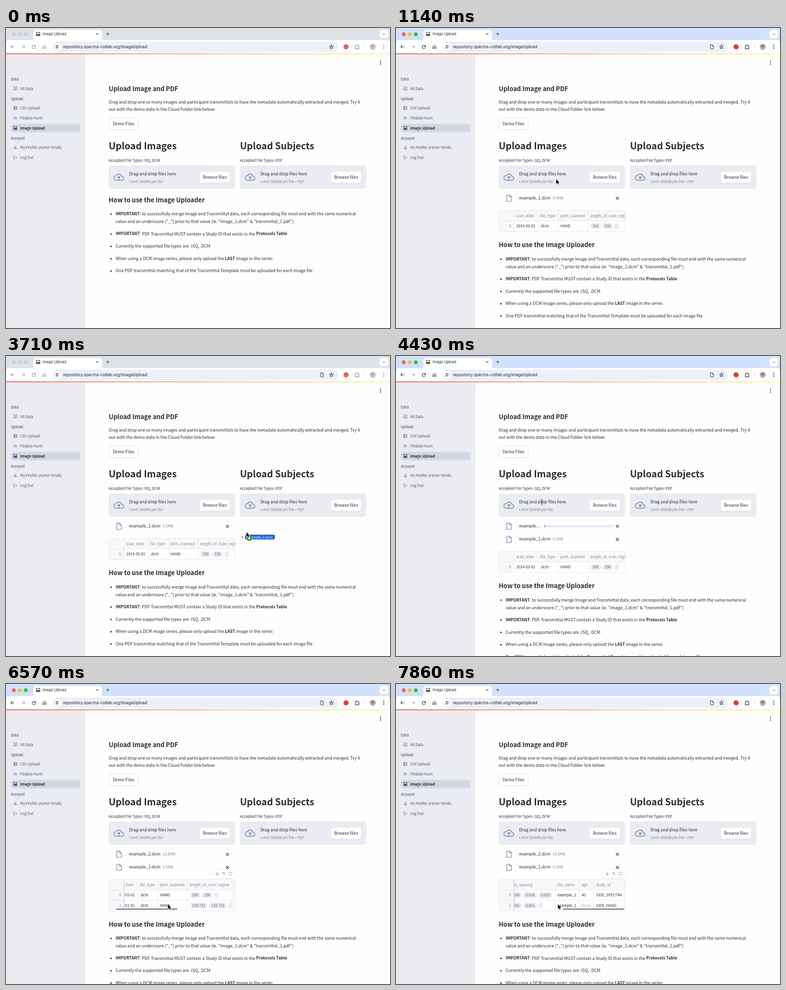
These frames come from a looping animation (800x623 px, 8 s). An HTML page with a canvas:

```html
<!DOCTYPE html>
<html lang="en">
<head>
<meta charset="utf-8">
<title>Image Upload</title>
<style>
html, body { margin: 0; width: 100%; height: 100%; overflow: hidden; background: #fefefe; }
canvas { display: block; width: 100vw; height: 100vh; }
</style>
</head>
<body>
<canvas></canvas>
<script>
const W = 800, H = 623, LOOP = 8000, FPS = 7;
const PAGE_FONT = '"Noto Sans CJK JP", "Noto Sans CJK SC", "Noto Sans CJK", sans-serif';
const UI_FONT = 'Inter, Roboto, sans-serif';
const BODY = 8.82, SMALL = 7.7;
const INK = '#292a33', GREY = '#82848f', PANEL = '#eaecf1', LINE = '#e3e4e9', STEEL = '#8192b0';

const canvas = document.querySelector('canvas');
const ratio = window.devicePixelRatio || 1;
canvas.width = W * ratio;
canvas.height = H * ratio;
const ctx = canvas.getContext('2d');
ctx.scale(ratio, ratio);

// Icon outlines on a 24 unit grid
const ICONS = {
  back: 'M20 12H4M11 5l-7 7 7 7',
  forward: 'M4 12h16M13 5l7 7-7 7',
  reload: 'M19 9A8 8 0 1 0 20 13M20 4v6h-6',
  home: 'M4 10l8-7 8 7v11h-5v-7H9v7H4z',
  tune: 'M3 7h6M15 7h6M3 17h3M12 17h9M15 7a3 3 0 1 1-6 0a3 3 0 1 1 6 0M12 17a3 3 0 1 1-6 0a3 3 0 1 1 6 0',
  star: 'M12 3l2.7 6 6.5.6-5 4.3 1.5 6.4-5.7-3.4-5.7 3.4 1.5-6.4-5-4.3 6.5-.6z',
  file: 'M5 2h9l6 6v14H5zM14 2v6h6',
  puzzle: 'M4 7h5a3 3 0 0 1 6 0h5v5a3 3 0 0 1 0 5v4H4v-5a3 3 0 0 0 0-5z',
  close: 'M5 5l14 14M19 5L5 19',
  plus: 'M12 4v16M4 12h16',
  chevron: 'M5 9l7 7 7-7',
  chart: 'M3 3h18v18H3zM8 17v-5M12 17V8M16 17v-3',
  table: 'M3 3h18v18H3zM3 9h18M3 15h18M7 3v18',
  form: 'M2 6h14M2 11h12M2 16h7M13 20l1-4 6-6 2 2-6 6z',
  photo: 'M13 3H3v18h18V11M6 17l4-5 3 3 2-2 3 4zM19 1v8M15 5h8',
  person: 'M16 8a4 4 0 1 1-8 0a4 4 0 1 1 8 0M4 20v-2c0-5 16-5 16 0v2z',
  logout: 'M11 3H3v18h8M9 12h12M16 7l5 5-5 5',
  cloud: 'M18.5 11A6.7 6.7 0 0 0 6 9A5 5 0 0 0 6 19H19a4 4 0 0 0-.5-8z',
  upArrow: 'M12 8.5l-4 4.3h2.8V16.5h2.4v-3.7H16z',
  download: 'M12 3v12M7 10l5 5 5-5M4 16v4h16v-4',
  search: 'M16 10a6 6 0 1 1-12 0a6 6 0 1 1 12 0M15 15l6 6',
  expand: 'M3 9V3h6M15 3h6v6M21 15v6h-6M9 21H3v-6',
  arrow: 'M0 0v9.6l2.2-2 1.6 3.5 1.7-.8-1.6-3.3h3z',
};
const paths = Object.fromEntries(Object.entries(ICONS).map(([name, d]) => [name, new Path2D(d)]));

function icon(name, cx, cy, size, color, width = 2, fill = false) {
  ctx.save();
  ctx.translate(cx - size / 2, cy - size / 2);
  ctx.scale(size / 24, size / 24);
  ctx.lineWidth = width;
  ctx.strokeStyle = ctx.fillStyle = color;
  fill ? ctx.fill(paths[name]) : ctx.stroke(paths[name]);
  ctx.restore();
}

// y is the middle of the capital letters; returns the x where the text ends
function text(s, x, y, { size = BODY, color = INK, bold = false, font = PAGE_FONT, align = 'left' } = {}) {
  ctx.font = `${bold ? 700 : 400} ${size}px ${font}`;
  ctx.textAlign = align;
  ctx.fillStyle = color;
  ctx.fillText(s, x, y + size * 0.367);
  return x + ctx.measureText(s).width;
}

function rich(s, x, y) {
  s.split('*').forEach((part, k) => {
    x = text(part, x, y, k % 2 ? { bold: true, size: BODY * 0.97 } : {});
  });
}

function box(x, y, w, h, radius, fill, stroke) {
  ctx.beginPath();
  ctx.roundRect(x, y, w, h, radius);
  if (fill) { ctx.fillStyle = fill; ctx.fill(); }
  if (stroke) { ctx.strokeStyle = stroke; ctx.lineWidth = 0.8; ctx.stroke(); }
}

function dot(x, y, r, color) {
  ctx.beginPath();
  ctx.arc(x, y, r, 0, 7);
  ctx.fillStyle = color;
  ctx.fill();
}

function line(x1, y1, x2, y2, color = LINE, width = 0.8) {
  ctx.beginPath();
  ctx.moveTo(x1, y1);
  ctx.lineTo(x2, y2);
  ctx.strokeStyle = color;
  ctx.lineWidth = width;
  ctx.stroke();
}

function kebab(x, y, color) {
  for (const dy of [-3.4, 0, 3.4]) dot(x, y + dy, 1.05, color);
}

function drawBrowser(active, hasPageIcon) {
  const dark = active ? '#2c2e32' : '#8b8e94', faint = '#9a9da3';
  box(0, 0, W, 30, 0, active ? '#d3e2fc' : '#dee3ea');
  box(0, 25, W, 28, [6, 6, 0, 0], '#fff');
  box(57, 4, 143, 24, [6, 6, 0, 0], '#fff');
  ['#ff5f57', '#febc2e', '#28c840'].forEach((c, k) => dot(16.3 + 12.5 * k, 13, 4.1, active ? c : '#cdd0d6'));
  icon('photo', 67, 12.5, 9.5, '#222', 2.6);
  text('Image Upload', 76, 12.5, { size: 7.5, font: UI_FONT, color: '#25272a' });
  icon('close', 190, 12.5, 7.5, '#333', 3);
  icon('plus', 212, 12.5, 9, '#333', 2.8);
  box(778.5, 4, 17.5, 17.5, 5, '#fff');
  icon('chevron', 787.5, 12.7, 7.5, '#333', 3.2);

  icon('back', 13.7, 39, 10.5, dark, 2.4);
  icon('forward', 35.7, 39, 10.5, faint, 2.4);
  icon('reload', 58, 39, 10, dark, 2.5);
  icon('home', 80, 39, 10, dark, 2.3);
  box(97, 28, 595, 22, 11, '#ecf0f8');
  dot(106.5, 39, 8, '#fff');
  icon('tune', 106.5, 39, 9.5, '#333', 2.4);
  text('repository.spectra-collab.org/imageUpload', 118.5, 39, { size: 8.65, font: UI_FONT, color: '#202226' });
  if (hasPageIcon) icon('file', 658, 39, 10, '#3a3c40', 2.4);
  icon('star', 678, 39, 10.5, '#333', 2.3);
  dot(708.5, 39, 5.3, active ? '#e23b30' : '#ec6158');
  icon('puzzle', 731.3, 39, 11, dark, 2.4);
  line(747.5, 34.5, 747.5, 43.5, '#c9d3e4');
  dot(764, 39, 6.3, active ? '#b9aaa4' : '#cdc5c1');
  dot(764, 37.8, 2.4, active ? '#7d6c66' : '#a89f9b');
  kebab(787, 39, dark);

  const glow = ctx.createLinearGradient(0, 0, W, 0);
  glow.addColorStop(0, '#ff4b4b');
  glow.addColorStop(1, '#fffd80');
  box(0, 52.8, W, 1.8, 0, glow);
}

function drawSidebar() {
  box(0, 54.5, 165, H, 0, PANEL);
  const label = (s, y) => text(s, 10, y, { size: SMALL, color: '#40424c' });
  const link = (name, s, y, bold) => {
    icon(name, 19.5, y, 8.6, bold ? INK : '#63656f', bold ? 2.8 : 2.1);
    text(s, 29.5, y, { size: bold ? 7.58 : SMALL, bold, color: bold ? INK : '#50525c' });
  };
  label('Data', 106.5);
  link('chart', 'All Data', 125.7);
  label('Upload', 147);
  link('table', 'CSV Upload', 166);
  link('form', 'Fillable Form', 187);
  box(10, 199.3, 145, 17.2, 5, '#d1d7e3');
  link('photo', 'Image Upload', 207.8, true);
  label('Account', 229);
  link('person', 'My Profile (Aaron Telvik)', 248);
  link('logout', 'Log Out', 269);
}

function button(s, x, y, w) {
  box(x, y, w, 24.5, 5, '#fff', '#d4d5da');
  text(s, x + w / 2, y + 12.1, { align: 'center' });
}

function drawUploader(x, title, types, limit) {
  text(title, x, 244.5, { size: 19.35, bold: true });
  text('Accepted File Types: ' + types, x, 274.7, { size: SMALL });
  box(x, 285.5, 263.3, 48.5, 5, PANEL);
  icon('cloud', x + 21.2, 309.5, 22.5, STEEL, 1.9);
  icon('upArrow', x + 21.2, 310.2, 22.5, STEEL, 1, true);
  text('Drag and drop files here', x + 42.5, 302.5);
  text(limit, x + 42.5, 318.8, { size: SMALL, color: GREY });
  button('Browse files', x + 188.5, 297.2, 65);
}

function drawFile({ name, size, progress }, y) {
  icon('file', 235.3, y + 0.7, 15.5, STEEL, 2.1);
  icon('close', 461.3, y + 0.7, 10, INK, 2.7);
  if (progress === undefined) {
    const end = text(name, 256.5, y);
    text(size, end + 4.7, y, { size: SMALL, color: GREY });
  } else {
    text('example…', 256.5, y);
    box(309, y - 2, 144.5, 5, 2.5, PANEL);
    ctx.save();
    ctx.beginPath();
    ctx.roundRect(309, y - 2, 144.5, 5, 2.5);
    ctx.clip();
    box(309, y - 2, 144.5 * progress, 5, 0, '#4b94dc');
    ctx.restore();
  }
}

const COLUMNS = [
  ['scan_date', 246, 50, ['2014-05-02', '2000-01-01']],
  ['file_type', 296, 42, ['.dcm', '.dcm']],
  ['joint_scanned', 338, 62, ['HAND', 'HAND']],
  ['length_of_scan_region', 400, 93, [['336', '336', ''], ['139.731', '139.731', '']]],
  ['voxel_spacing', 493, 103, [['0.656', '0.656', '0.625'], ['0.061', '0.061', '']]],
  ['file_name', 596, 50, ['example_1', 'example_2']],
  ['age', 646, 30, ['40', 'None']],
  ['study_id', 676, 65, ['3300_SPECTRA', '3309_HAND']],
];

function drawChips(values, x, y) {
  for (const value of values) {
    ctx.font = `400 ${SMALL}px ${PAGE_FONT}`;
    const w = ctx.measureText(value).width + 9.5;
    box(x, y - 6.2, w, 12.4, 6, '#ebecf1');
    text(value, x + 4.75, y, { size: SMALL, color: '#5b5d68' });
    x += w + 3;
  }
}

function drawTable(top, rows, scroll) {
  const height = 22.5 + 21.5 * rows, bottom = top + height;
  const rowY = r => top + 33 + 21.5 * r;
  ctx.save();
  ctx.beginPath();
  ctx.roundRect(214.3, top, 263, height, 4);
  ctx.clip();
  box(214, top, 264, height, 0, '#fff');
  box(214, top, 264, 22.3, 0, '#f7f8fa');
  box(214, top, 32, height, 0, '#f7f8fa');

  ctx.save();
  ctx.beginPath();
  ctx.rect(246, top, 232, height);
  ctx.clip();
  for (const [title, left, width, cells] of COLUMNS) {
    const x = left - scroll;
    ctx.save();
    ctx.beginPath();
    ctx.rect(x, top, width, height);
    ctx.clip();
    text(title, x + 4.5, top + 11.3, { size: SMALL, color: GREY });
    cells.slice(0, rows).forEach((cell, r) => {
      if (Array.isArray(cell)) drawChips(cell, x + 4.5, rowY(r));
      else text(cell, x + 4.5, rowY(r), { size: SMALL, color: cell === 'None' ? '#a9abb3' : INK });
    });
    ctx.restore();
    line(x + width, top, x + width, bottom);
  }
  ctx.restore();

  for (let r = 0; r < rows; r++) {
    text(String(r), 238, rowY(r), { size: SMALL, color: GREY, align: 'center' });
    line(214, top + 22.3 + 21.5 * r, 478, top + 22.3 + 21.5 * r);
  }
  line(246, top, 246, bottom, scroll ? '#c9cad0' : LINE, scroll ? 1.3 : 0.8);
  if (scroll) box(218.5 + scroll * 0.489, bottom - 5, 128, 3, 1.5, '#8f9096');
  ctx.restore();
  box(214.3, top, 263, height, 4, null, LINE);
}

function drawTableTools(y) {
  ctx.save();
  ctx.shadowColor = 'rgba(0,0,0,.14)';
  ctx.shadowBlur = 3 * ratio;
  box(431, y - 8.5, 46.5, 17, 4, '#fff');
  ctx.restore();
  ['download', 'search', 'expand'].forEach((name, k) => icon(name, 440.3 + 13.7 * k, y, 7.5, '#6b6d77', 2.5));
}

function drawHelp(dy) {
  text('How to use the Image Uploader', 214, 357 + dy, { size: 13, bold: true });
  const item = (s, y) => { dot(218.7, y + dy + 0.5, 1.6, INK); rich(s, 228.5, y + dy); };
  item('*IMPORTANT*: to successfully merge Image and Transmittal data, each corresponding file must end with the same numerical', 386);
  rich('value and an underscore ("_") prior to that value (ie. "image_1.dcm" & "transmittal_1.pdf")', 228.5, 401.8 + dy);
  item('*IMPORTANT*: PDF Transmittal MUST contain a Study ID that exists in the *Protocols Table*', 427.3);
  item('Currently the supported file types are .ISQ, .DCM', 453);
  item('When using a DCM image series, please only upload the *LAST* image in the series', 478.6);
  item('One PDF transmittal matching that of the Transmittal Template must be uploaded for each image file', 504.2);
}

function drawPointer(x, y) {
  ctx.save();
  ctx.translate(x, y);
  ctx.lineJoin = 'round';
  ctx.strokeStyle = '#fff';
  ctx.lineWidth = 1.6;
  ctx.stroke(paths.arrow);
  ctx.fillStyle = '#000';
  ctx.fill(paths.arrow);
  ctx.restore();
}

function drawTextCursor(x, y) {
  line(x, y - 4.5, x, y + 4.5, '#222', 1);
  line(x - 2, y - 4.8, x + 2, y - 4.8, '#222', 0.9);
  line(x - 2, y + 4.8, x + 2, y + 4.8, '#222', 0.9);
}

function drawDraggedFile(name, x, y) {
  box(x - 12.5, y + 5, 8, 10, 1, '#f1eeee');
  line(x - 10.5, y + 8.5, x - 6.5, y + 11.5, '#c0564e', 1.4);
  box(x - 3, y + 5, 62, 10, 3, '#2461d8');
  text(name, x + 2, y + 10, { size: 7.1, font: UI_FONT, color: '#fff' });
  dot(x + 5.7, y + 12.5, 5.8, '#2fa32f');
  icon('plus', x + 5.7, y + 12.5, 8.5, '#fff', 4);
  drawPointer(x, y);
}

const clamp01 = v => Math.min(1, Math.max(0, v));
const smooth = p => p * p * (3 - 2 * p);
const mix = (a, b, p) => a + (b - a) * p;

const between = (step, from, to) => clamp01((step - from) / (to - from));

function filesAt(step) {
  const first = { name: 'example_1.dcm', size: '0.5MB' };
  const second = { name: 'example_2.dcm', size: '10.6MB' };
  if (step < 5) return [];
  if (step === 5) return [{ ...first, progress: 0.3 }];
  if (step < 31) return [first];
  if (step < 33) return [{ ...second, progress: step === 31 ? 0.014 : 0.55 }, first];
  return [second, first];
}

function drawCursor(step) {
  if (step >= 1 && step < 4) {
    const p = between(step, 1, 4);
    drawDraggedFile('example_1.dcm', mix(501, 334, p), mix(366, 314, p));
  } else if (step >= 4 && step < 12) {
    const p = between(step, 8, 12) ** 1.4;
    drawPointer(mix(333.7, 810, p), mix(314, 620, p));
  } else if (step >= 26 && step < 30) {
    const p = between(step, 26, 29);
    drawDraggedFile('example_2.dcm', mix(501, 304, p), mix(366, 301, p));
  } else if (step >= 30 && step < 42) {
    drawTextCursor(304, 303);
  } else if (step >= 42) {
    const p = smooth(between(step, 41, 45));
    drawPointer(mix(304, 337.3, p), mix(303, 457.5, p));
  }
}

function draw(step) {
  const files = filesAt(step);
  const rows = step < 7 ? 0 : step < 34 ? 1 : 2;
  const scroll = 264 * smooth(between(step, 44.28, 54));
  const active = (step >= 5 && step < 14) || step >= 30;
  const tableTop = 351.5 + 27 * files.length;

  ctx.fillStyle = '#fefefe';
  ctx.fillRect(0, 0, W, H);
  drawSidebar();
  drawBrowser(active, step >= 5);
  kebab(780.3, 72, INK);

  text('Upload Image and PDF', 214, 126.5, { size: 13, bold: true });
  text('Drag and drop one or many images and participant transmittals to have the metadata automatically extracted and merged. Try it', 214, 153.3);
  text('out with the demo data in the Cloud Folder link below:', 214, 169);
  button('Demo Files', 214.3, 187, 61);
  drawUploader(214, 'Upload Images', 'ISQ, DCM', 'Limit 260MB per file');
  drawUploader(487.4, 'Upload Subjects', 'PDF', 'Limit 260MB per file • PDF');

  files.forEach((file, k) => drawFile(file, 353 + 27.2 * k));
  if (rows) drawTable(tableTop, rows, scroll);
  if (step >= 44) drawTableTools(tableTop - 12);
  drawHelp(files.length ? 7.5 + 27 * files.length + (rows && 37.5 + 21.5 * rows) : 0);
  drawCursor(step);
}

function tick() {
  const time = performance.now() % LOOP;
  draw(Math.floor((time + 5) * FPS / 1000) % (LOOP * FPS / 1000));
  requestAnimationFrame(tick);
}
tick();
</script>
</body>
</html>
```
